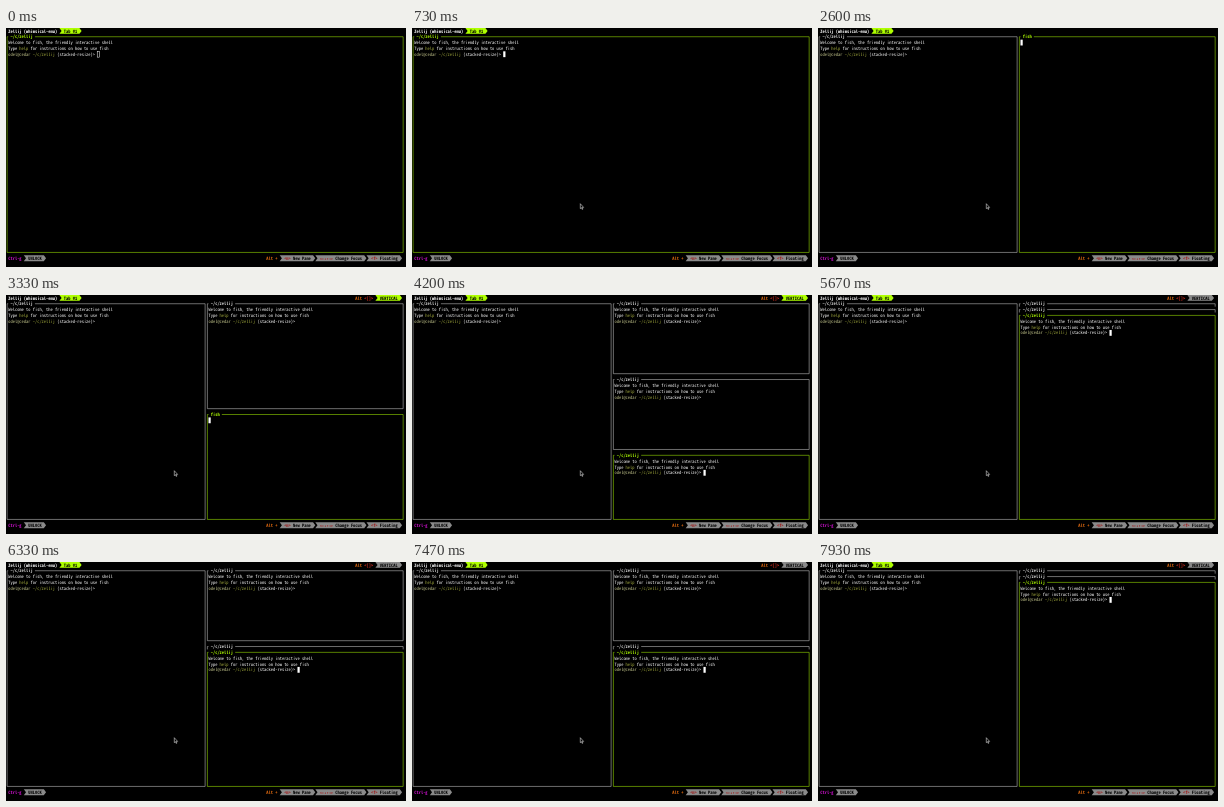
Recreate the animation shown at these times as an HTML page. Size 400 by 239 pixels, loop 8000 ms.

```html
<!DOCTYPE html>
<html lang="en">
<head>
<meta charset="utf-8">
<title>Stacked terminal panes</title>
<style>
  html, body { margin: 0; width: 100%; height: 100%; overflow: hidden; background: #000; }
  svg { display: block; width: 100vw; height: 100vh; }
  text {
    font-family: "Noto Sans Mono CJK JP", "Noto Sans Mono", monospace;
    white-space: pre; text-rendering: geometricPrecision;
  }
  .arrows { font: bold 37px "DejaVu Sans Mono", monospace; }
</style>
</head>
<body>
<svg id="stage" viewBox="0 0 4000 2390"></svg>
<script>
const LOOP = 8000;
const W = 22.25, H = 2390 / 41;            // one terminal cell
const MID = 90, LAST = 178;                // first column of the right half, last column
const LIME = '#afff00', GREY = '#8a8a8a', FRAME = '#d8d8d8', WHITE = '#fff';
const OLIVE = '#a0a83c', HOST = '#c4c68c', ORANGE = '#e06a10', RED = '#e03020', DARK_RED = '#a02020';
const stage = document.getElementById('stage');

// Font size at which one character is exactly one cell wide
const pen = document.createElement('canvas').getContext('2d');
pen.font = '100px "Noto Sans Mono CJK JP", "Noto Sans Mono", monospace';
stage.style.fontSize = 100 * W / pen.measureText('0').width + 'px';

const escape = s => s.replace(/&/g, '&amp;').replace(/</g, '&lt;');

function text(col, row, str, fill = WHITE, bold = false, cls = '') {
  return `<text x="${col * W}" y="${(row + 0.5) * H + 16}" fill="${fill}"` +
    `${bold ? ' font-weight="700"' : ''}${cls && ` class="${cls}"`}>${escape(str)}</text>`;
}

function runs(col, row, parts) {
  return parts.map(([str, fill, bold, cls]) => {
    const out = text(col, row, str, fill, bold, cls);
    col += str.length;
    return out;
  }).join('');
}

function ribbon(col, row, fill, parts) {
  const len = parts.reduce((n, p) => n + p[0].length, 0);
  const l = col * W, r = (col + len + 4) * W, y = row * H;
  return `<path fill="${fill}" d="M${l} ${y}H${r - W}L${r} ${y + H / 2}L${r - W} ${y + H}H${l}L${l + W} ${y + H / 2}Z"/>` +
    runs(col + 2, row, parts.map(([s, c, cls]) => [s, c || '#000', true, cls]));
}

function cursor(col, row, hollow) {
  const look = hollow ? `fill="none" stroke="${WHITE}" stroke-width="5"` : 'fill="#fff"';
  return `<rect x="${col * W}" y="${row * H}" width="${W}" height="${H}" ${look}/>`;
}

// shell: 0 empty, 1 greeting, 2 greeting and prompt
function pane({ left, right, top, bottom, shell, focus, hollow }) {
  const color = focus ? LIME : FRAME;
  const title = shell === 2 ? '~/c/zellij' : 'fish';
  const x1 = (left + 0.5) * W, x2 = (right + 0.5) * W, y1 = (top + 0.5) * H;
  const y2 = bottom > top ? (bottom + 0.5) * H : y1 + H / 2;
  const base = bottom > top ? `H${x2}` : `M${x2} ${y2}`;
  const lines = `M${x1 + W / 2} ${y1}H${x1}V${y2}${base}V${y1}H${(left + title.length + 3) * W}`;
  let out = `<path d="${lines}" fill="none" stroke="${color}" stroke-width="5"/>` +
    text(left + 2, top, title, color, true);
  if (bottom === top) return out;
  const c = left + 1, r = top + 1;
  if (shell > 0) {
    out += text(c, r, 'Welcome to fish, the friendly interactive shell') +
      runs(c, r + 1, [['Type '], ['help', OLIVE], [' for instructions on how to use fish']]);
  }
  if (shell > 1) {
    out += runs(c, r + 2, [['odel@cedar ', HOST], ['~/c/zellij', OLIVE], [' (stacked-resize)>']]);
  }
  if (focus) out += shell > 1 ? cursor(c + 40, r + 2, hollow) : cursor(c, r + 2 * shell, hollow);
  return out;
}

// Right column: start time, then top and bottom row of each pane
const thirds = [[1, 13], [14, 26], [27, 38]];
const pair = [[1, 13], [14, 14], [15, 38]];
const stack = [[1, 1], [2, 2], [3, 38]];
const layouts = [
  [0, []], [2600, [[1, 38]]], [3270, [[1, 19], [20, 38]]], [3800, thirds], [5070, pair],
  [5330, stack], [6330, pair], [6600, thirds], [7470, pair], [7730, stack]
];
const born = [2600, 3270, 3800];

function bars(t) {
  let out = text(1, 0, 'Zellij (whimsical-emu)', WHITE, true) +
    ribbon(24, 0, LIME, [['Tab #1']]) +
    text(1, 39, 'Ctrl-g', '#d010d0', true) +
    ribbon(8, 39, GREY, [['UNLOCK']]) +
    text(117, 39, 'Alt +', ORANGE, true) +
    ribbon(123, 39, GREY, [['<n>', DARK_RED], [' New Pane']]) +
    ribbon(139, 39, GREY, [['<←↓↑→>', DARK_RED, 'arrows'], [' Change Focus']]) +
    ribbon(162, 39, GREY, [['<f>', DARK_RED], [' Floating']]);
  if (t >= 2670) {
    out += runs(157, 0, [['Alt ', ORANGE, true], ['<[]>', RED, true]]) +
      ribbon(166, 0, t < 5070 ? LIME : GREY, [['VERTICAL']]);
  }
  return out;
}

const mouse = '<path d="M1683 1757V1806L1694 1797L1701 1814L1709 1811L1702 1794H1716Z" ' +
  'fill="#000" stroke="#fff" stroke-width="5"/>';

function scene(t) {
  const column = layouts.filter(([start]) => start <= t).pop()[1];
  const split = column.length > 0;
  let out = bars(t) + pane({
    left: 0, right: split ? MID - 1 : LAST, top: 1, bottom: 38,
    shell: 2, focus: !split, hollow: t < 600
  });
  column.forEach(([top, bottom], i) => {
    const age = t - born[i];
    out += pane({
      left: MID, right: LAST, top, bottom,
      shell: age < 190 ? 0 : age < 260 ? 1 : 2,
      focus: i === column.length - 1
    });
  });
  return out + (t >= 600 ? mouse : '');
}

let shown = '';
const begin = performance.now();
function draw() {
  const next = scene((performance.now() - begin) % LOOP);
  if (next !== shown) stage.innerHTML = shown = next;
  requestAnimationFrame(draw);
}
draw();
</script>
</body>
</html>
```
